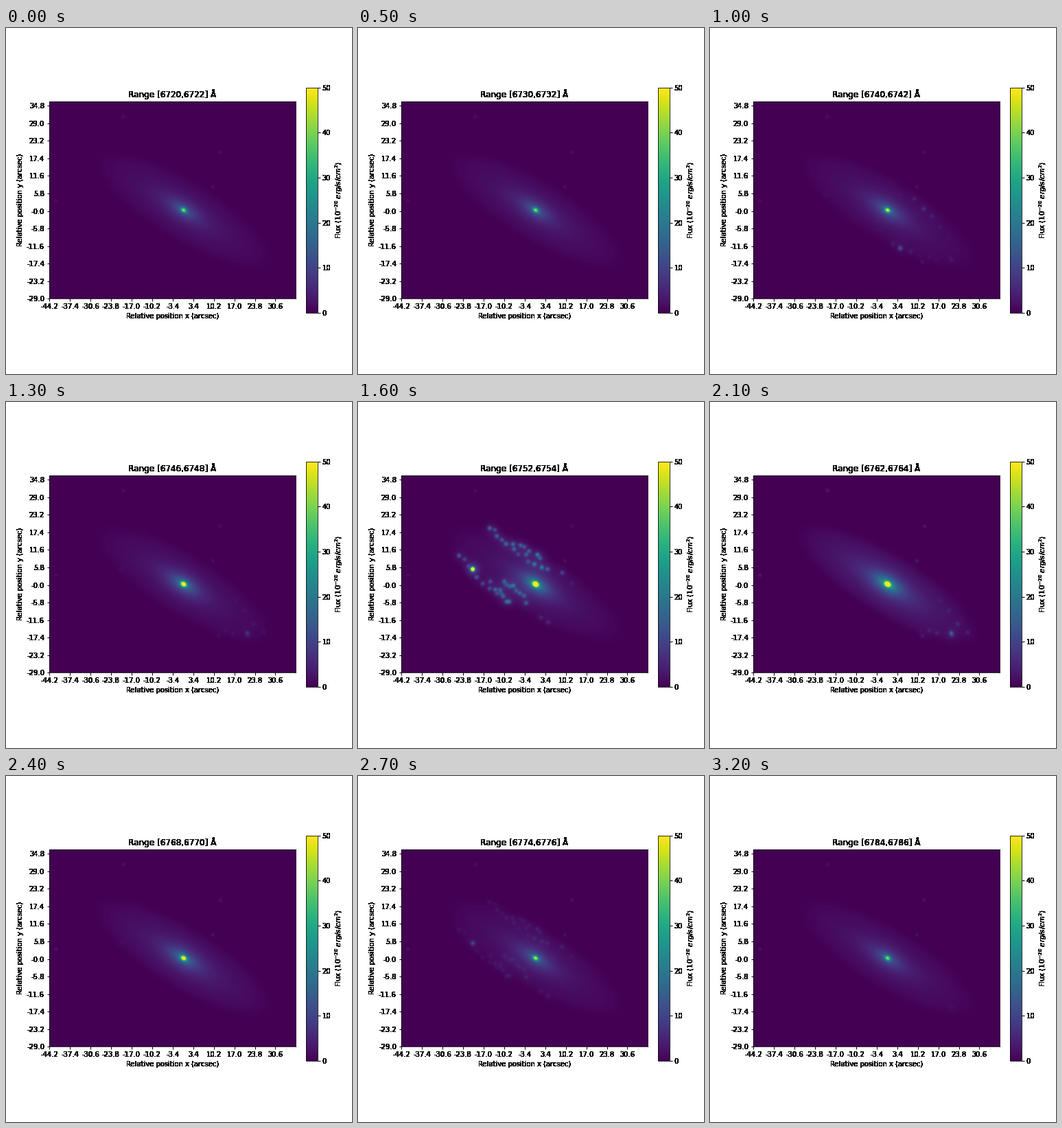
Recreate the animation shown at these times as a matplotlib script. Size 504 by 504 pixels, loop 3.3 s.

```python
import numpy as np
import matplotlib.pyplot as plt
from matplotlib.animation import FuncAnimation
from matplotlib.text import Text

SIZE, DPI = 504, 72
FRAMES, STEP = 33, 100
NX, NY = 407, 326
CX, CY, TILT = 258.5, 266.0, np.radians(31.5)

plt.rcParams.update({
    "font.family": "DejaVu Sans", "font.size": 10,
    "xtick.major.width": 1, "ytick.major.width": 1,
})
rng = np.random.default_rng(4)

# Grid of cells, measured in stage pixels
CELL = 358.57 / NX
X, Y = np.meshgrid(63 + CELL * (np.arange(NX) + 0.5),
                   394.35 - CELL * (np.arange(NY) + 0.5))


def along(x, y):
    return (x - CX) * np.cos(TILT) + (y - CY) * np.sin(TILT)


def across(x, y):
    return (y - CY) * np.cos(TILT) - (x - CX) * np.sin(TILT)


def radius(ratio):
    return np.hypot(along(X, Y), across(X, Y) / ratio)


def bell(d, width):
    return np.exp(-0.5 * (d / width) ** 2)


def blob(x, y, width):
    return bell(np.hypot(X - x, Y - y), width)


def make_disc():
    r = radius(0.3)
    edge = 1 / (1 + np.exp((r - 135) / 10))
    return (7 * np.exp(-r / 45) + 0.7) * edge


def make_knot(x, y, flux):
    image = flux * (blob(x, y, 2.0) + 0.1 * blob(x, y, 6.5))
    center = 6756 + 4 * np.tanh((along(x, y) - 35) / 45)
    return center, image


def arm(start, bend, end, count, flux):
    """Knots scattered along a quadratic curve."""
    for t in np.linspace(0, 1, count):
        p = ((1 - t) ** 2 * np.array(start) + 2 * t * (1 - t) * np.array(bend)
             + t ** 2 * np.array(end))
        x, y = p + rng.normal(0, 2, 2)
        yield make_knot(x, y, flux * rng.uniform(0.6, 1.4))


disc = make_disc()
core = 26 * bell(radius(0.82), 2.8) + 11 * np.exp(-radius(0.6) / 13)
stars = sum(2.4 * blob(x, y, 1.7)
            for x, y in [(73, 253), (171, 130), (312, 182), (301, 232)])
knots = [
    make_knot(167, 244, 75), make_knot(351, 337, 75),
    make_knot(277, 322, 40), make_knot(309, 341, 40),
    *arm((193, 185), (222, 218), (274, 246), 13, 13),
    *arm((237, 208), (250, 218), (264, 230), 5, 15),
    *arm((147, 223), (165, 250), (205, 276), 8, 11),
    *arm((196, 266), (208, 286), (222, 291), 7, 14),
    *arm((212, 262), (225, 270), (248, 290), 8, 13),
    *arm((266, 310), (300, 345), (375, 336), 8, 20),
    *arm((299, 250), (325, 280), (361, 322), 6, 20),
]


def line_strength(wave, center):
    """Main line with a weaker companion on either side."""
    d = wave - center
    return bell(d, 1.7) + 0.2 * (bell(d + 15.2, 1.7) + bell(d - 21.2, 1.7))


def flux_map(wave):
    gain = 1 + 0.65 * bell(wave - 6763, 4)
    nucleus = 1 + 1.6 * bell(wave - 6757, 8)
    total = gain * (disc + stars) + nucleus * core
    for center, image in knots:
        total += line_strength(wave, center) * image
    return total


def harden(img, dpi):
    """Turn soft glyph edges into solid black."""
    out = np.zeros_like(img)
    out[..., 3] = img[..., 3] > 0.03
    return out, 0, 0


fig, ax = plt.subplots(figsize=(SIZE / DPI, SIZE / DPI), dpi=DPI,
                       facecolor="white")
fig.subplots_adjust(left=0.125, right=0.9, bottom=0.125, top=0.88)
im = ax.imshow(flux_map(6721), cmap="viridis", vmin=0, vmax=50,
               origin="lower", extent=(0, NX, 0, NY))

xt, yt = np.arange(0, NX, 34), np.arange(0, NY, 29)
ax.set_xticks(xt, [f"{(v - 221) / 5:.1f}" for v in xt])
ax.set_yticks(yt, [f"{(v - 145) / 5 - 1e-9:.1f}" for v in yt])
ax.set_xlabel("Relative position x (arcsec)")
ax.set_ylabel("Relative position y (arcsec)")
title = ax.set_title("Range [6720,6722] Å")

bar = fig.colorbar(im, fraction=0.042, pad=0.04, ticks=range(0, 51, 10))
bar.set_label(r"Flux (10$^{-20}$ $erg/s/cm^2$)")

fig.canvas.draw()
for text in fig.findobj(Text):
    text.set_agg_filter(harden)


def update(i):
    start = 6720 + 2 * i
    im.set_data(flux_map(start + 1))
    title.set_text(f"Range [{start},{start + 2}] Å")
    return im, title


anim = FuncAnimation(fig, update, frames=FRAMES, interval=STEP,
                     repeat=True, repeat_delay=0, blit=False)
plt.show()
```
